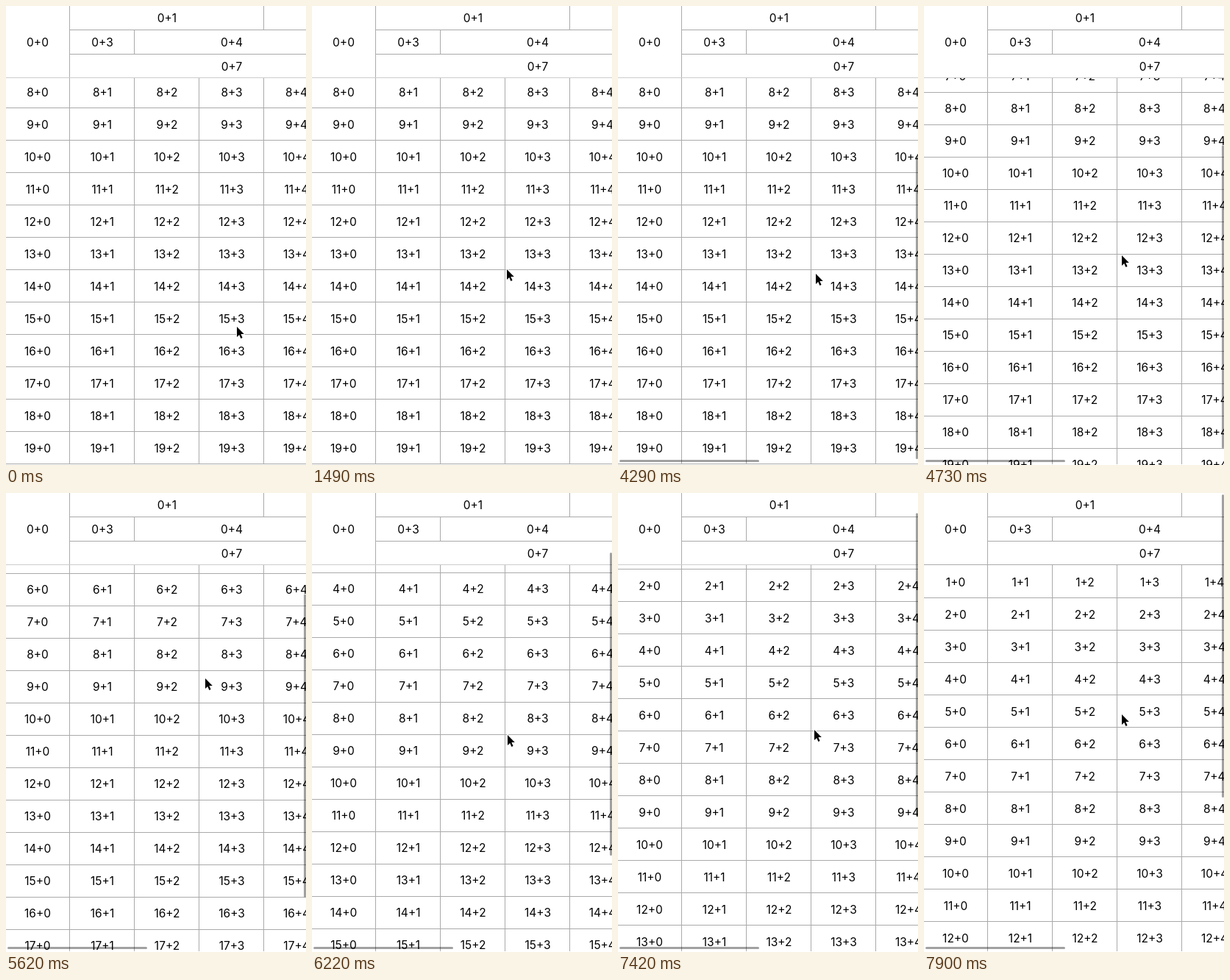
These frames come from a looping animation (408 px wide and 624 px high, 8 s). An HTML page with a canvas:

```html
<!DOCTYPE html>
<html lang="en">
<head>
<meta charset="utf-8">
<title>Sticky table header</title>
<style>
  html, body { margin: 0; width: 100%; height: 100%; overflow: hidden; background: #fff; }
  canvas { display: block; width: 408px; height: 624px; }
</style>
</head>
<body>
<canvas id="stage"></canvas>
<script>
const W = 408, H = 624, LOOP = 8000, HOLD = 588, TICK = 148;
const HEADER = 98, ROW = 44, COLUMN = 88, LAST_ROW = 19, MAX_SCROLL = 312;
const LINE = '#aaa', SOFT_LINE = '#ccc';

const canvas = document.getElementById('stage');
const ctx = canvas.getContext('2d');
const ratio = window.devicePixelRatio || 1;
canvas.width = W * ratio;
canvas.height = H * ratio;
ctx.scale(ratio, ratio);

// Progress from 0 to 1 between two ticks; a power above 1 eases out.
function glide(tick, from, to, power = 1) {
  const p = Math.min(1, Math.max(0, (tick - from) / (to - from)));
  return 1 - (1 - p) ** power;
}

// Three swipes pull the table down to its first row.
function scrollAt(tick) {
  return 102.6 * glide(tick, 26, 35)
    + 118.4 * glide(tick, 35, 43, 1.93)
    + 91 * glide(tick, 43, 50);
}

// The bars flash once, then return for the swipes.
function barOpacity(tick) {
  return glide(tick, 11, 13) - glide(tick, 14, 16.1) + glide(tick, 19, 22);
}

function cursorAt(tick) {
  let x = 314, y = 436;
  const move = (from, to, dx, dy, power) => {
    const p = glide(tick, from, to, power);
    x += dx * p;
    y += dy * p;
  };
  move(0, 7, -49, -78);
  move(8, 10, -2, 22);
  move(11, 16, -1, -13);
  move(19, 23, 7, -3);
  move(26, 35, 2, -112);
  move(35, 43, -6, 97, 2.27);
  move(43, 50, 4, -48);
  return [Math.round(x), Math.round(y)];
}

function rect(x, y, w, h, color) {
  ctx.fillStyle = color;
  ctx.fillRect(x, y, w, h);
}

function label(text, x, baseline) {
  ctx.fillStyle = '#000';
  ctx.fillText(text, x, baseline);
}

const columnCenter = col => 43 + COLUMN * col;
const columnLine = col => 86 + COLUMN * col;

function drawRows(shift) {
  for (let col = 0; col < 4; col++) rect(columnLine(col), HEADER, 1, 525, LINE);
  for (let row = 1; row <= LAST_ROW; row++) {
    const bottom = 138 + ROW * (row - 8) + shift;
    if (bottom < HEADER || bottom > H + ROW) continue;
    rect(0, Math.round(bottom), W, 1, LINE);
    for (let col = 0; col < 5; col++) label(`${row}+${col}`, columnCenter(col), bottom - 15.5);
  }
}

function drawHeader(atTop) {
  rect(0, 0, W, HEADER, '#fff');
  rect(columnLine(0), 0, 1, HEADER, LINE);
  rect(columnLine(3), 0, 1, 32, LINE);
  rect(columnLine(1), 32, 1, 33, LINE);
  rect(columnLine(0), 32, W, 1, LINE);
  rect(columnLine(0), 65, W, 1, LINE);
  rect(0, 97, W, 1, atTop ? LINE : SOFT_LINE);
  label('0+0', columnCenter(0), 54.5);
  label('0+1', columnCenter(2), 21.5);
  label('0+3', columnCenter(1), 54.5);
  label('0+4', columnCenter(3), 54.5);
  label('0+7', columnCenter(3), 87.5);
}

function drawBars(shift, opacity) {
  const top = 204 - 202 * shift / MAX_SCROLL;
  ctx.fillStyle = `rgba(0,0,0,${.37 * opacity})`;
  ctx.beginPath();
  ctx.roundRect(2, 617, 190, 3, 1.5);
  ctx.roundRect(405, top, 3, 412, 1.5);
  ctx.fill();
}

const arrow = new Path2D('M0 0V14L3.2 11 5.4 16 7.6 15 5.4 10.1H9.8Z');

function drawCursor(x, y) {
  ctx.save();
  ctx.translate(x, y);
  ctx.lineJoin = 'round';
  ctx.lineWidth = 2;
  ctx.strokeStyle = '#fff';
  ctx.stroke(arrow);
  ctx.fillStyle = '#000';
  ctx.fill(arrow);
  ctx.restore();
}

function draw(now) {
  const time = now % LOOP;
  const tick = time < 600 ? 0 : Math.floor((time - HOLD) / TICK) + 1;
  const shift = scrollAt(tick);
  rect(0, 0, W, H, '#fff');
  ctx.font = '15.5px Inter, sans-serif';
  ctx.textAlign = 'center';
  drawRows(shift);
  drawHeader(shift >= MAX_SCROLL - .5);
  drawBars(shift, barOpacity(tick));
  drawCursor(...cursorAt(tick));
}

const start = performance.now();
function loop() {
  draw(performance.now() - start);
  requestAnimationFrame(loop);
}
loop();
</script>
</body>
</html>
```
